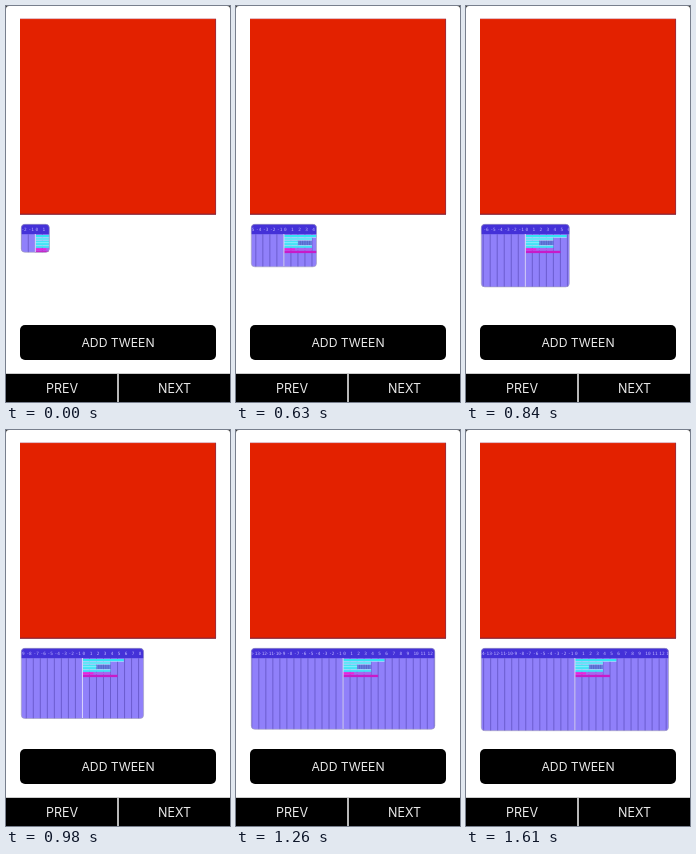
These frames come from a looping animation (224x396 px, 1680 ms). An HTML page:

```html
<!DOCTYPE html>
<html lang="en">
<head>
<meta charset="utf-8">
<title>Resizable timeline</title>
<style>
html, body { margin: 0; width: 100%; height: 100%; overflow: hidden; background: #fff; }
svg { display: block; width: 100vw; height: 100vh; }
.ui { font: 12.2px Inter, "Liberation Sans", sans-serif; fill: #e8e8e8; text-anchor: middle; }
.nav { font-size: 12.5px; }
.ruler { font: 4.4px "DejaVu Sans Mono", monospace; fill: #bdb5ff; }
</style>
</head>
<body>
<svg viewBox="0 0 224 396">
  <defs><clipPath id="clip"><rect id="clipBox" x="15.3" y="218.3" rx="3.5"/></clipPath></defs>
  <rect width="224" height="396" fill="#fff"/>
  <path d="M0 0H3Q0 0 0 3ZM224 0H221Q224 0 224 3Z" fill="#333"/>
  <rect x="14" y="13" width="196" height="195.5" fill="#e32100"/>
  <path d="M14 12.6H210" stroke="#d9a3b0" stroke-width=".8"/>
  <path d="M209.6 13V208" stroke="#8c3048" stroke-width=".8"/>
  <path d="M14 208.2H210" stroke="#702040"/>
  <g clip-path="url(#clip)">
    <rect x="15" y="218" width="200" height="90" fill="#9080fa"/>
    <rect x="15" y="218" width="200" height="10.2" fill="#4431d8"/>
    <g id="track"></g>
  </g>
  <rect id="edge" x="15.3" y="218.3" rx="3.5" fill="none" stroke="#a5a1ba" stroke-width=".6"/>
  <rect x="14" y="319" width="196" height="35" rx="5"/>
  <rect y="367.8" width="224" height="28.2"/>
  <rect x="111" y="368" width="2" height="28" fill="#b8b8b8"/>
  <g class="ui">
    <text x="112" y="341.2">ADD TWEEN</text>
    <text class="nav" x="56" y="386.7">PREV</text>
    <text class="nav" x="168.5" y="386.7">NEXT</text>
  </g>
</svg>
<script>
const LOOP = 1680, STEP = 70, UNIT = 7.02, LEFT = 15.3;
// time, panel width, panel height
const keys = [
  [0, 28, 28], [350, 28, 28], [420, 28.2, 28], [560, 28.2, 28],
  [630, 65.2, 42.5], [840, 88, 62.6], [1050, 139.4, 74], [1120, 139.6, 74.2],
  [1190, 167, 78.5], [1260, 183.5, 81], [1400, 186.4, 82], [1610, 187.2, 82.4], [LOOP, 187.2, 82.4]
];
const byId = id => document.getElementById(id);
const track = byId("track");

function add(tag, attrs, text) {
  const el = document.createElementNS("http://www.w3.org/2000/svg", tag);
  for (const name in attrs) el.setAttribute(name, attrs[name]);
  if (text !== undefined) el.textContent = text;
  track.append(el);
}

function bar(from, to, y, height, fill) {
  add("rect", { x: from * UNIT, y, width: (to - from) * UNIT, height, fill });
}

for (let n = -14; n <= 14; n++) {
  const x = n * UNIT;
  add("path", { d: `M${x} 228.2V308`, stroke: "#6254c4", "stroke-width": .8 });
  add("text", { x: x + .2, y: 225.2, class: "ruler" }, n);
}

bar(0, 5.9, 229, 2.3, "#35e4f4");
bar(0, 4, 231.8, 2.2, "#62e3f7");
bar(0, 2, 234.5, 4.7, "#45e3f5");
bar(2, 4, 234.5, 4.7, "#657fe0");
for (let i = 1; i < 6; i++) {
  const x = (2 + i / 3) * UNIT;
  add("path", { d: `M${x} 234.5V239.2`, stroke: "#5257b8", "stroke-width": .6 });
}
bar(0, 4, 239.6, 2.2, "#42e3f5");
for (const [y, end] of [[231.5, 5.9], [234.2, 4], [236.8, 2], [239.4, 4]])
  bar(0, end, y - .25, .5, "#c8f4ff");
bar(0, 1.6, 242.3, 2.2, "#ef22dc");
bar(1.6, 4, 242.3, 2.2, "#ad63ed");
bar(0, 5, 244.8, 2.3, "#c81bc8");
add("path", { d: "M0 228V308", stroke: "#e0daff", "stroke-width": 1 });

function sizeAt(time) {
  const i = keys.findIndex((key, k) => k && time < key[0]);
  const a = keys[i - 1], b = keys[i];
  const p = (time - a[0]) / (b[0] - a[0]);
  return [1, 2].map(k => a[k] + (b[k] - a[k]) * p);
}

function draw(time) {
  const [width, height] = sizeAt(Math.floor(time / STEP) * STEP);
  for (const id of ["clipBox", "edge"]) {
    byId(id).setAttribute("width", width);
    byId(id).setAttribute("height", height);
  }
  track.setAttribute("transform", `translate(${LEFT + width / 2} 0)`);
}

const start = performance.now();
function tick() {
  draw((performance.now() - start) % LOOP);
  requestAnimationFrame(tick);
}
tick();
</script>
</body>
</html>
```
